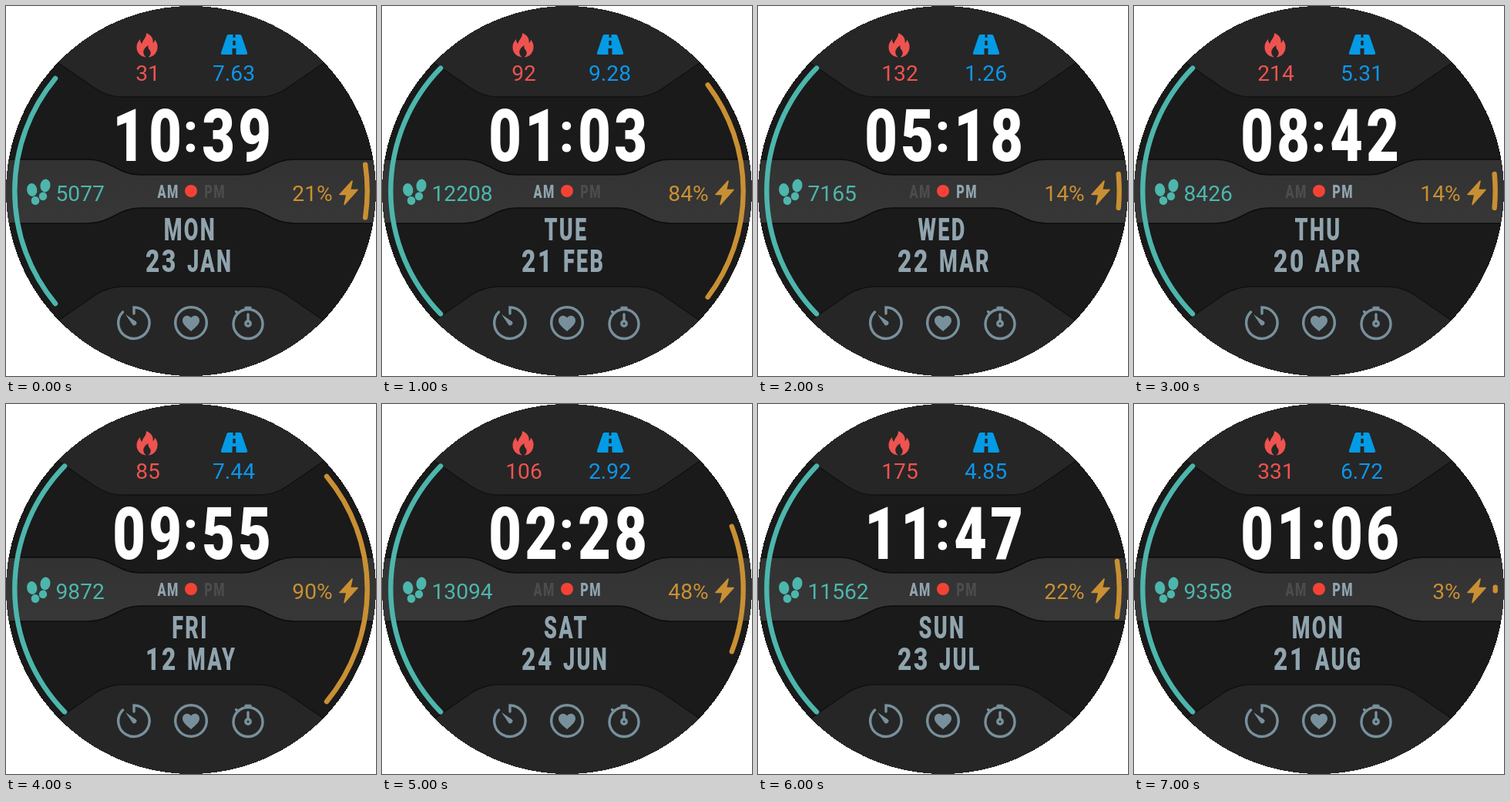
An HTML page for the animation above (8 s loop, 480 by 480 pixels).

```html
<!DOCTYPE html>
<html lang="en">
<head>
<meta charset="utf-8">
<title>Watch face</title>
<style>
html, body { margin: 0; width: 100%; height: 100%; overflow: hidden; background: #fff; }
svg { display: block; width: 100%; height: 100%; }
text { font-family: Roboto, sans-serif; font-size: 28.2px; }
.mid { text-anchor: middle; }
.end { text-anchor: end; }
.time { font-size: 95.5px; font-weight: 900; fill: #fff; }
.colon { font-size: 72px; font-weight: 700; fill: #fff; }
.cond { font-weight: 900; letter-spacing: 3.5px; fill: #90a4ae; }
.date { font-size: 41px; }
.half { font-size: 24px; letter-spacing: 2px; }
.red { fill: #ef5350; }
.blue { fill: #0c96e9; }
.teal { fill: #4db6ac; }
.gold { fill: #c99033; }
.arc { fill: none; stroke-width: 6.4; stroke-linecap: round; }
.line { fill: none; stroke: #78909c; stroke-width: 3.4; stroke-linecap: round; }
.grey { fill: #78909c; }
</style>
</head>
<body>
<svg viewBox="0 0 480 480">
  <defs>
    <linearGradient id="band" x1="0" y1="0" x2="0" y2="1">
      <stop offset="0" stop-color="#323232"/><stop offset="1" stop-color="#373737"/>
    </linearGradient>
  </defs>

  <rect width="480" height="480" fill="#1a1a1a"/>
  <g fill="#262626" stroke="#111" stroke-width="1.4">
    <path d="M-5 -5V24L116 107Q132 118 152 118H328Q348 118 364 107L485 24V-5Z"/>
    <path d="M-5 485V458L116 375Q132 364 152 364H328Q348 364 364 375L485 458V485Z"/>
  </g>
  <path fill="url(#band)" stroke="#0c0c0c" stroke-width="1.6"
    d="M-5 199H106C136 199 146 219 174 219H306C334 219 344 199 374 199H485V282H374C344 282 334 262 306 262H174C146 262 136 282 106 282H-5Z"/>
  <path fill="#fff" fill-rule="evenodd" shape-rendering="crispEdges"
    d="M0 0H480V480H0ZM0 240A240 240 0 0 0 480 240A240 240 0 0 0 0 240Z"/>

  <path id="stepArc" class="arc" stroke="#4db6ac"/>
  <path id="battArc" class="arc" stroke="#c99033"/>

  <!-- flame -->
  <path class="red" d="M182 35C189 38 191.500 43 190.500 48C192 47 193 45.500 193 43.500C196 47 197 51 196.500 54C196 61.500 190.500 66.500 184.500 66.500C188 64 188.500 60 186.500 57.500C185 55.500 184 54 184.500 51C180 54 177.500 57.500 178.500 61.500C179 64 180.500 65.500 182 66.500C175 66 169.500 61 169.500 53.500C169.500 48.500 172 45.500 174 43C174 46 175 48 176.500 49C177 44 182.500 41 182 35Z"/>
  <!-- road -->
  <path fill="#039be5" d="M288.500 37H303.500Q305 37 305.500 38.500L313 60.500Q313.800 63 311 63H281Q278.200 63 279 60.500L286.500 38.500Q287 37 288.500 37Z"/>
  <path fill="#262626" d="M294.500 36.500H297.500V41H294.500ZM294.300 45H297.700V51H294.300ZM293.500 55H298.500V63.500H293.500Z"/>
  <!-- footprints -->
  <g class="teal">
    <ellipse cx="33.700" cy="238.500" rx="6.600" ry="8.500" transform="rotate(-10 33.700 238.500)"/>
    <ellipse cx="38" cy="252.500" rx="5.300" ry="5.600" transform="rotate(-10 38 252.500)"/>
    <ellipse cx="51" cy="233" rx="6.500" ry="8.500" transform="rotate(10 51 233)"/>
    <ellipse cx="48" cy="246.800" rx="5.200" ry="5.400" transform="rotate(10 48 246.800)"/>
  </g>
  <path class="gold" stroke="#c99033" stroke-width="1.6" stroke-linejoin="round"
    d="M449 227L433 244.500H442L439 257.500L456 238.500H446.500Z"/>

  <!-- timer -->
  <path class="line" d="M166 399V391A20.200 20.200 0 1 1 151.500 397"/>
  <path class="grey" d="M155 400L169 409.500A3.300 3.300 0 0 1 164.500 414Z"/>
  <!-- heart rate -->
  <circle class="line" cx="240" cy="411" r="20.300"/>
  <path class="grey" d="M240 422C233 416 229 412.500 229 408C229 401.500 236.500 399.500 240 404.500C243.500 399.500 251 401.500 251 408C251 412.500 247 416 240 422Z"/>
  <!-- stopwatch -->
  <circle class="line" cx="314" cy="412.500" r="19"/>
  <path class="line" d="M311 391.500H317M298.500 396.500L300 398M314 400V409"/>
  <circle class="line" cx="314" cy="412" r="3.200"/>

  <text id="kcal" class="red mid" x="184" y="97"/>
  <text id="dist" class="blue mid" x="295.500" y="97"/>
  <text id="steps" class="teal" x="64.500" y="252.800"/>
  <text id="batt" class="gold end" x="423.700" y="252.800"/>
  <g transform="translate(240 200.500) scale(.77 1)"><text id="time" class="time mid"/></g>
  <text class="colon mid" x="239.500" y="188.500">:</text>
  <g transform="translate(210.500 249) scale(.68 1)"><text id="am" class="cond half mid">AM</text></g>
  <g transform="translate(271 249) scale(.68 1)"><text id="pm" class="cond half mid">PM</text></g>
  <circle cx="240" cy="240" r="8" fill="#f44336"/>
  <g transform="translate(239 304) scale(.66 1)"><text id="day" class="cond date mid"/></g>
  <g transform="translate(181 345) scale(.77 1)"><text id="date" class="cond date"/></g>
  <g transform="translate(235 345) scale(.66 1)"><text id="month" class="cond date"/></g>
</svg>
<script>
const HOLD = 1000, GOAL = 5640;
const $ = id => document.getElementById(id);

// kcal, distance, time, half, steps, battery, day, date, month
const faces = [
  [31, '7.63', '1039', 'am', 5077, 21, 'MON', 23, 'JAN'],
  [92, '9.28', '0103', 'am', 12208, 84, 'TUE', 21, 'FEB'],
  [132, '1.26', '0518', 'pm', 7165, 14, 'WED', 22, 'MAR'],
  [214, '5.31', '0842', 'pm', 8426, 14, 'THU', 20, 'APR'],
  [85, '7.44', '0955', 'am', 9872, 90, 'FRI', 12, 'MAY'],
  [106, '2.92', '0228', 'pm', 13094, 48, 'SAT', 24, 'JUN'],
  [175, '4.85', '1147', 'am', 11562, 22, 'SUN', 23, 'JUL'],
  [331, '6.72', '0106', 'pm', 9358, 3, 'MON', 21, 'AUG']
];

// Arc centred on the horizontal axis; side is -1 (left) or 1 (right).
function arc(side, part) {
  const cap = .8;
  const a = (Math.min(part, 1) * 45 - cap) * Math.PI / 180, r = 228.7;
  const x = 240 + side * r * Math.cos(a), h = r * Math.sin(a);
  return `M${x} ${240 - h}A${r} ${r} 0 0 ${side > 0 ? 1 : 0} ${x} ${240 + h}`;
}

$('time').setAttribute('x', [159.5, 206.5, 275.5, 322.5].map(x => (x - 240) / .77).join(' '));

let shown = -1;
function draw(ms) {
  const n = Math.floor(ms / HOLD) % faces.length;
  if (n === shown) return;
  shown = n;
  const [kcal, dist, time, half, steps, batt, day, date, month] = faces[n];
  const words = { kcal, dist, time, steps, batt: batt + '%', day, date, month };
  for (const id in words) $(id).textContent = words[id];
  for (const id of ['am', 'pm']) $(id).style.fill = id === half ? '#90a4ae' : '#4b4c4e';
  $('stepArc').setAttribute('d', arc(-1, steps / GOAL));
  $('battArc').setAttribute('d', arc(1, batt / 100));
}

const start = performance.now();
function tick() {
  draw(performance.now() - start);
  requestAnimationFrame(tick);
}
tick();
</script>
</body>
</html>
```
